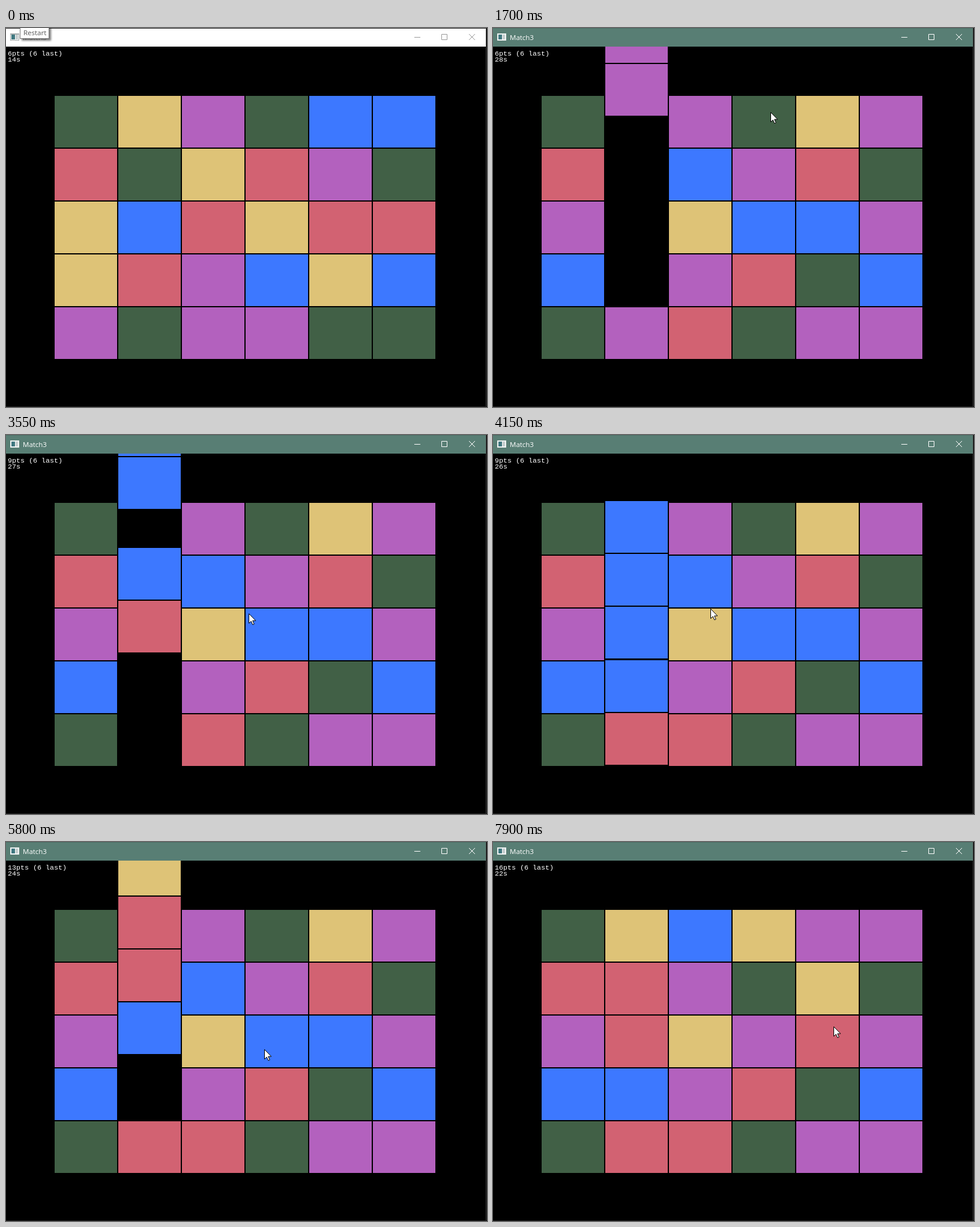
Write an HTML page with a canvas that moves like this. It is 801x631 px and loops after 8 s.

```html
<!DOCTYPE html>
<html lang="en">
<head>
<meta charset="utf-8">
<title>Match3</title>
<style>
html, body { margin: 0; width: 100%; height: 100%; overflow: hidden; background: #000; }
canvas { display: block; }
</style>
</head>
<body>
<canvas id="stage" width="801" height="631"></canvas>
<script>
const g = document.getElementById('stage').getContext('2d');
const LOOP = 8000, STEP = 50;
const CLOSE = 250, OPEN = 500, START = 650;
const LEFT = 81, TOP = 113, PITCH_X = 106, PITCH_Y = 88, TILE_W = 104, TILE_H = 86;
const ROW_MS = 283;
const COLORS = { G: '#416046', Y: '#dec377', P: '#b361be', B: '#3d78ff', R: '#d26272' };

// Columns, listed from top to bottom.
const OLD_BOARD = ['GRYYP', 'YGBRG', 'PYRPP', 'GRYBP', 'BPRYG', 'BGRBG'];
const NEW_BOARD = ['GRPBG', 'GGGRP', 'BYPRR', 'PBRRG', 'YRBGP', 'PGPBP'];

// Tiles vanish at `cut`; the column refills from `go` on.
const DROPS = [
  { cut: 720, go: 1384, col: 1, row: 0, fresh: 'BRPP' },
  { cut: 720, go: 1384, col: 2, row: 3, fresh: 'P' },
  { cut: 720, go: 1384, col: 3, row: 3, fresh: 'G' },
  { cut: 2516, go: 3309, col: 1, row: 2, fresh: 'BBB' },
  { cut: 4158, go: 4951, col: 1, row: 0, fresh: 'YRRB' },
  { cut: 6854, go: 7612, col: 2, row: 2, fresh: 'B' },
  { cut: 6854, go: 7612, col: 3, row: 2, fresh: 'Y' },
  { cut: 6854, go: 7612, col: 4, row: 2, fresh: 'P' }
];
const SWAP = { col: 2, row: 1, from: 6654, to: 6854 };
const SCORES = [[0, 0], [1384, 6], [3309, 9], [4951, 13], [7612, 16]];

// Pointer path: time, x, y
const PATH = [
  [250, 30, -20], [700, 225, 87], [1250, 390, 125], [1700, 462, 140], [1800, 553, 190],
  [2200, 500, 400], [2650, 390, 510], [2850, 345, 527], [3300, 375, 380], [3500, 393, 310],
  [3550, 404, 297], [4000, 372, 292], [4400, 345, 285], [4900, 341, 272], [5200, 471, 430],
  [5500, 465, 410], [6050, 400, 290], [6500, 345, 240], [6650, 346, 248], [6800, 355, 314],
  [7300, 470, 350], [7900, 567, 307]
];

function rect(x, y, w, h, color) {
  g.fillStyle = color;
  g.fillRect(x, y, w, h);
}

function label(s, x, y, font, color) {
  g.font = font;
  g.fillStyle = color;
  g.fillText(s, x, y);
}

function tile(kind, col, row) {
  rect(LEFT + col * PITCH_X, Math.round(TOP + row * PITCH_Y), TILE_W, TILE_H, COLORS[kind]);
}

function stack(kinds, col, row) {
  [...kinds].forEach((k, i) => tile(k, col, row + i));
}

function drawSwap(kinds, t) {
  const { col, row, from, to } = SWAP, p = (t - from) / (to - from);
  stack(kinds.slice(0, row), col, 0);
  stack(kinds.slice(row + 2), col, row + 2);
  tile(kinds[row + 1], col, row + 1 - p);
  tile(kinds[row], col, row + p);
}

function drawColumn(kinds, col, t) {
  let swapped = col !== SWAP.col;
  for (const d of DROPS) {
    if (d.col !== col || t < d.cut) continue;
    if (!swapped && d.cut >= SWAP.to) {
      kinds = swapTiles(kinds);
      swapped = true;
    }
    const n = d.fresh.length, above = kinds.slice(0, d.row), below = kinds.slice(d.row + n);
    const p = Math.max(0, (t - d.go) / (n * ROW_MS));
    if (p < 1) {
      stack(below, col, d.row + n);
      stack(above, col, n * p);
      if (p > 0) stack(d.fresh, col, (n + 1) * (p - 1));
      return;
    }
    kinds = d.fresh + above + below;
  }
  if (!swapped && t >= SWAP.from) drawSwap(kinds, t);
  else stack(kinds, col, 0);
}

function swapTiles(k) {
  const r = SWAP.row;
  return k.slice(0, r) + k[r + 1] + k[r] + k.slice(r + 2);
}

function drawStatus(points, seconds) {
  const font = '11.67px "Liberation Mono", monospace';
  label(points + 'pts (6 last)', 3, 46, font, '#fff');
  label(seconds + 's', 3, 56, font, '#fff');
}

function drawTitleBar(active) {
  const ink = active ? '#fff' : '#999';
  rect(0, 0, 799, 31, active ? '#587e74' : '#fff');
  rect(0, 0, 799, 1, active ? '#4c6d64' : '#222');

  rect(7, 9, 15, 12, active ? '#e9efee' : '#a5abab');
  rect(8, 11, 13, 9, '#f8f8f8');
  rect(9, 11, 6, 8, '#3f7880');
  rect(16, 11, 4, 8, '#c4cccd');
  label('Match3', 28, 20, '11.5px "Open Sans", sans-serif', ink);

  g.strokeStyle = ink;
  g.lineWidth = 1;
  g.beginPath();
  g.moveTo(680, 15.5);
  g.lineTo(690, 15.5);
  g.rect(725.5, 10.5, 9, 9);
  g.moveTo(771, 10);
  g.lineTo(781, 20);
  g.moveTo(781, 10);
  g.lineTo(771, 20);
  g.stroke();
}

function drawTooltip() {
  g.save();
  g.shadowColor = 'rgba(0,0,0,.5)';
  g.shadowBlur = 3;
  g.shadowOffsetX = g.shadowOffsetY = 3;
  rect(23, -4, 49, 22, '#767676');
  g.restore();
  rect(24, -3, 47, 20, '#fff');
  label('Restart', 29, 12, '11.5px "Open Sans", sans-serif', '#575757');
}

function drawPointer(t) {
  if (t < PATH[0][0]) return;
  let i = PATH.findIndex(k => k[0] > t);
  if (i < 0) i = PATH.length - 1;
  const [t0, x0, y0] = PATH[i - 1], [t1, x1, y1] = PATH[i];
  const p = Math.min(1, (t - t0) / (t1 - t0));
  g.save();
  g.translate(Math.round(x0 + (x1 - x0) * p) + 0.5, Math.round(y0 + (y1 - y0) * p) + 0.5);
  const arrow = new Path2D('M0 0V16L3.7 12.6L6.3 18.3L8.7 17.3L6.2 11.6H11.3Z');
  g.fillStyle = '#fff';
  g.fill(arrow);
  g.strokeStyle = '#000';
  g.lineWidth = 1;
  g.stroke(arrow);
  g.restore();
}

function drawWindow(t) {
  const old = t < CLOSE;
  if (old) {
    OLD_BOARD.forEach((kinds, col) => stack(kinds, col, 0));
    drawStatus(6, 14);
  } else if (t >= START) {
    NEW_BOARD.forEach((kinds, col) => drawColumn(kinds, col, t));
    const points = SCORES.filter(s => t >= s[0]).pop()[1];
    drawStatus(points, t <= 700 ? 30 : 29 - Math.floor((t - 700) / 1000));
  }
  drawTitleBar(!old);
  rect(799, 0, 1, 631, '#444');
  rect(0, 630, 800, 1, '#222');
  if (old) drawTooltip();
}

function draw(now) {
  const t = Math.floor((now % LOOP) / STEP) * STEP;
  rect(0, 0, 801, 631, '#000');
  if (t < CLOSE || t >= OPEN) drawWindow(t);
  drawPointer(t);
}

let began;
function frame(now) {
  began ??= now;
  draw(now - began);
  requestAnimationFrame(frame);
}
draw(0);
requestAnimationFrame(frame);
</script>
</body>
</html>
```
